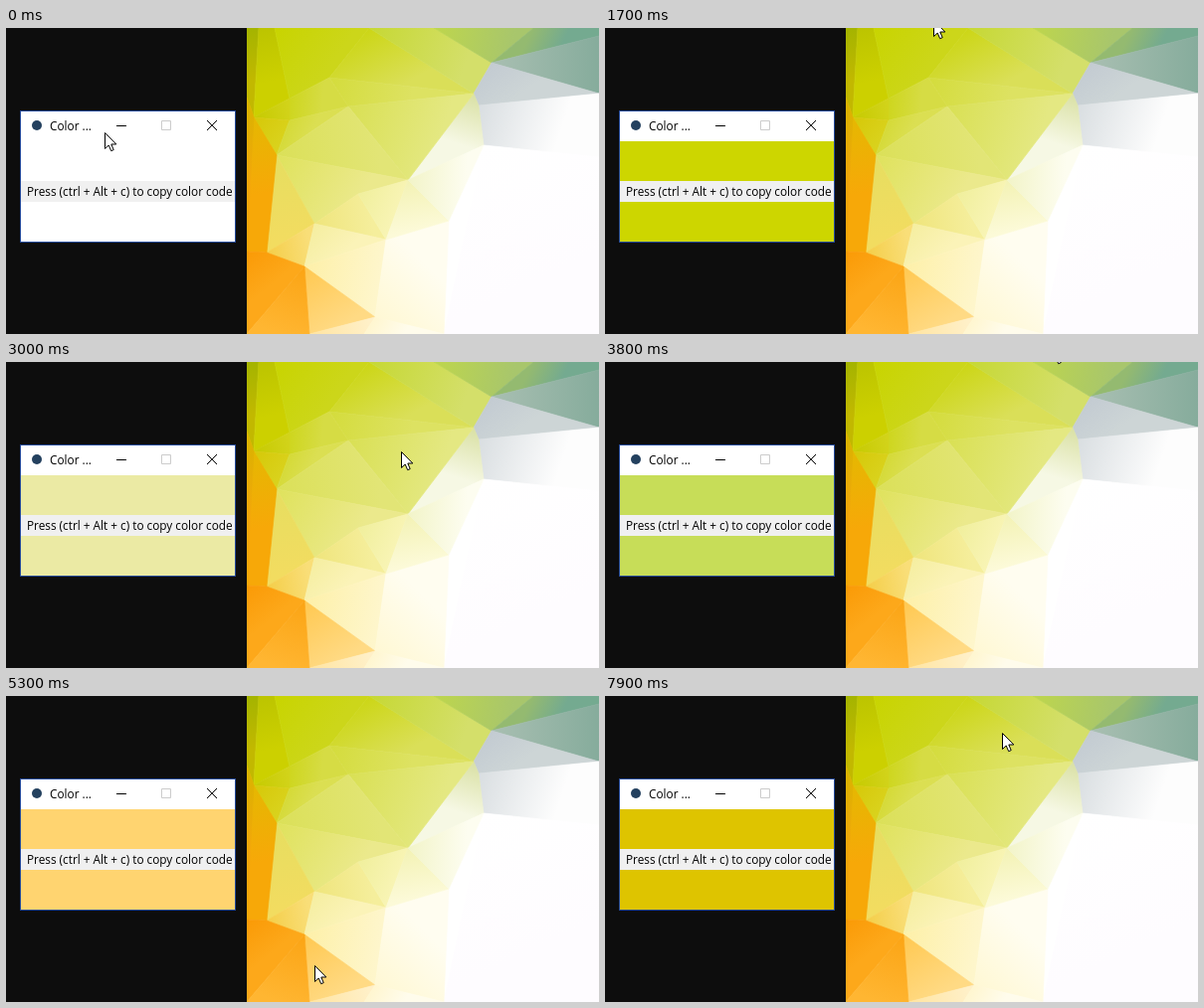
Animation of 596x308 px, one loop 8 s. Source, as an HTML page:

```html
<!DOCTYPE html>
<html lang="en">
<head>
<meta charset="utf-8">
<title>Color picker</title>
<style>
  html, body { margin: 0; width: 100%; height: 100%; overflow: hidden; background: #0d0d0d; }
  svg { display: block; width: 100%; height: 100%; }
  text { font: 11.8px "Open Sans", "Noto Sans", sans-serif; fill: #000; }
</style>
</head>
<body>
<svg viewBox="0 0 596 308">
  <defs id="shades"></defs>
  <rect x="242" width="354" height="308" fill="#fff"/>
  <g id="facets" stroke-width=".7" stroke-linejoin="round"></g>
  <rect width="242" height="308" fill="#0d0d0d"/>

  <rect x="14.5" y="83.5" width="216" height="132" fill="#fff" stroke="#254a9a"/>
  <rect id="swatch" x="15" y="114" width="215" height="101" fill="#fff"/>
  <rect x="15" y="154" width="215" height="21" fill="#f0f0f0"/>
  <circle cx="31" cy="98" r="5" fill="#24415f"/>
  <text x="44" y="103">Color ...</text>
  <text x="21" y="169">Press (ctrl + Alt + c) to copy color code</text>
  <g fill="none" stroke="#000">
    <path d="M111 98.5h10"/>
    <path d="M156.5 93.5h9v9h-9z" stroke="#ccc"/>
    <path d="M202 93l10 10m0-10l-10 10"/>
  </g>
  <path id="cursor" d="M-.5.5V16.5L3.2 13L5.7 18.7L8.2 17.6L5.8 12H10.8Z" fill="#fff" stroke="#000"/>
</svg>
<script>
const points = {
  a: [242, 0], b: [254, 0], c: [270, 0], d: [365, 0], e: [430, 0], f: [530, 0], g: [596, 0],
  h: [596, 66], i: [488, 35], j: [470, 66], k: [475, 78], l: [344, 79], m: [325, 50],
  n: [285, 71], o: [285, 93], p: [249, 90], q: [272, 128], r: [262, 226], s: [300, 240],
  t: [305, 308], u: [371, 291], v: [382, 213], w: [310, 197], x: [404, 153], y: [354, 167],
  A: [242, 70], B: [242, 225], C: [242, 308], D: [480, 118], E: [445, 194], F: [440, 308],
  G: [596, 308], H: [596, 130], I: [596, 8], K: [360, 308]
};

// Each facet fades from its first corner to the middle of the others.
const facets = `
  abpA #a4b400 #c2b800
  bcnp #bcc400 #ccd000
  cdmn #c8d400 #ccd61a
  dmj #ccd616 #dadf58
  deij #c6d834 #d4df6a
  efi #bed64c #a8c66c
  fgIi #94ba70 #74aa90
  iIh #a9bfb2 #86ac9c
  ihkj #c3cbd2 #cdd5d6
  khHD #d9dee1 #fdfdfd
  DHGF #fff #fefcff
  jkDx #d9e0a4 #f6f8e4
  mjl #d4dc3c #dde262
  nmlo #ced61e #d6dc44
  pno #c6ca00 #d2d31a
  poq #d6c808 #d9d21c
  olq #d5da38 #dbdf52
  ljx #d9e054 #e4e882
  qlx #dbe058 #e2e576
  qxyw #dfe25c #ebe98c
  pqr #dec400 #ecca28
  qwr #e6de60 #f2dc60
  rws #f4ce48 #f9de78
  wyv #efe57c #f5ee9c
  yxv #f0ef9c #f8f4b4
  wvs #f5eea0 #fbf3b8
  svu #fdf0a8 #fef6cc
  sut #ffc850 #ffda84
  tuK #ffe4a0 #fff0c8
  uvEF #fff8d4 #fffdf0
  uFK #fff6d0 #fffcec
  xEv #f3f2b4 #fcfad8
  xDE #f2f4c8 #fdfdf0
  ApqrB #e0bc00 #f7a808
  ApB #d8b400 #f4a60a
  BrsC #fa9a06 #fda81a
  sCt #fba414 #ffb632`.trim().split("\n").map(row => row.trim().split(" "));

// Every stretch ends at the given cursor place and swatch colour.
const moves = [
  [100, 500, 215, 85, "#fff"],
  [600, 900, 300, 55, "#cad40a"],
  [1000, 1500, 331, -8, "#ccd508"],
  [1700, 1700, 331, -8, "#cdd600"],
  [1900, 2400, 322, 168, "#e5e67a"],
  [2700, 2800, 320, 175, "#ebeaa4"],
  [3000, 3000, 398, 90, "#ebeaa4"],
  [3100, 3600, 450, -17, "#c9dc50"],
  [3800, 3800, 450, -17, "#c7dd58"],
  [4200, 4500, 336, 212, "#c7dd58"],
  [4800, 5300, 311, 271, "#ffd470"],
  [5400, 5500, 308, 284, "#ffcc62"],
  [5900, 6200, 278, 290, "#ffb632"],
  [6400, 6400, 278, 290, "#ffb42a"],
  [6800, 7100, 256, 200, "#f4b000"],
  [7300, 7500, 248, 100, "#dec400"],
  [7800, 7900, 400, 37, "#dec400"]
];
const LOOP = 8000, TICK = 100;

const byId = id => document.getElementById(id);
const mix = (from, to, k) => from + (to - from) * k;

function add(parent, tag, attributes) {
  const node = document.createElementNS("http://www.w3.org/2000/svg", tag);
  for (const [name, value] of Object.entries(attributes)) node.setAttribute(name, value);
  return parent.appendChild(node);
}

facets.forEach(([corners, near, far], index) => {
  const shape = [...corners].map(name => points[name]);
  const [first, ...rest] = shape;
  const middle = axis => rest.reduce((sum, point) => sum + point[axis], 0) / rest.length;
  const id = "shade" + index;
  const shade = add(byId("shades"), "linearGradient", {
    id, gradientUnits: "userSpaceOnUse",
    x1: first[0], y1: first[1], x2: middle(0), y2: middle(1)
  });
  add(shade, "stop", { offset: 0, "stop-color": near });
  add(shade, "stop", { offset: 1, "stop-color": far });
  const paint = `url(#${id})`;
  add(byId("facets"), "polygon", { points: shape.join(" "), fill: paint, stroke: paint });
});

function poseAt(time) {
  const tick = Math.floor(time / TICK) * TICK;
  let pose = { x: 100, y: 105, color: "#fff" };
  for (const [start, end, x, y, color] of moves) {
    if (tick < start) break;
    const k = Math.min(1, (tick - start + TICK) / (end - start + TICK));
    pose = {
      x: Math.round(mix(pose.x, x, k)),
      y: Math.round(mix(pose.y, y, k)),
      color: k === 1 ? color : `color-mix(in srgb, ${color} ${k * 100}%, ${pose.color})`
    };
  }
  return pose;
}

const origin = performance.now();
function draw() {
  const { x, y, color } = poseAt(Math.max(0, performance.now() - origin) % LOOP);
  byId("cursor").setAttribute("transform", `translate(${x} ${y})`);
  byId("swatch").style.fill = color;
  requestAnimationFrame(draw);
}
draw();
</script>
</body>
</html>
```
